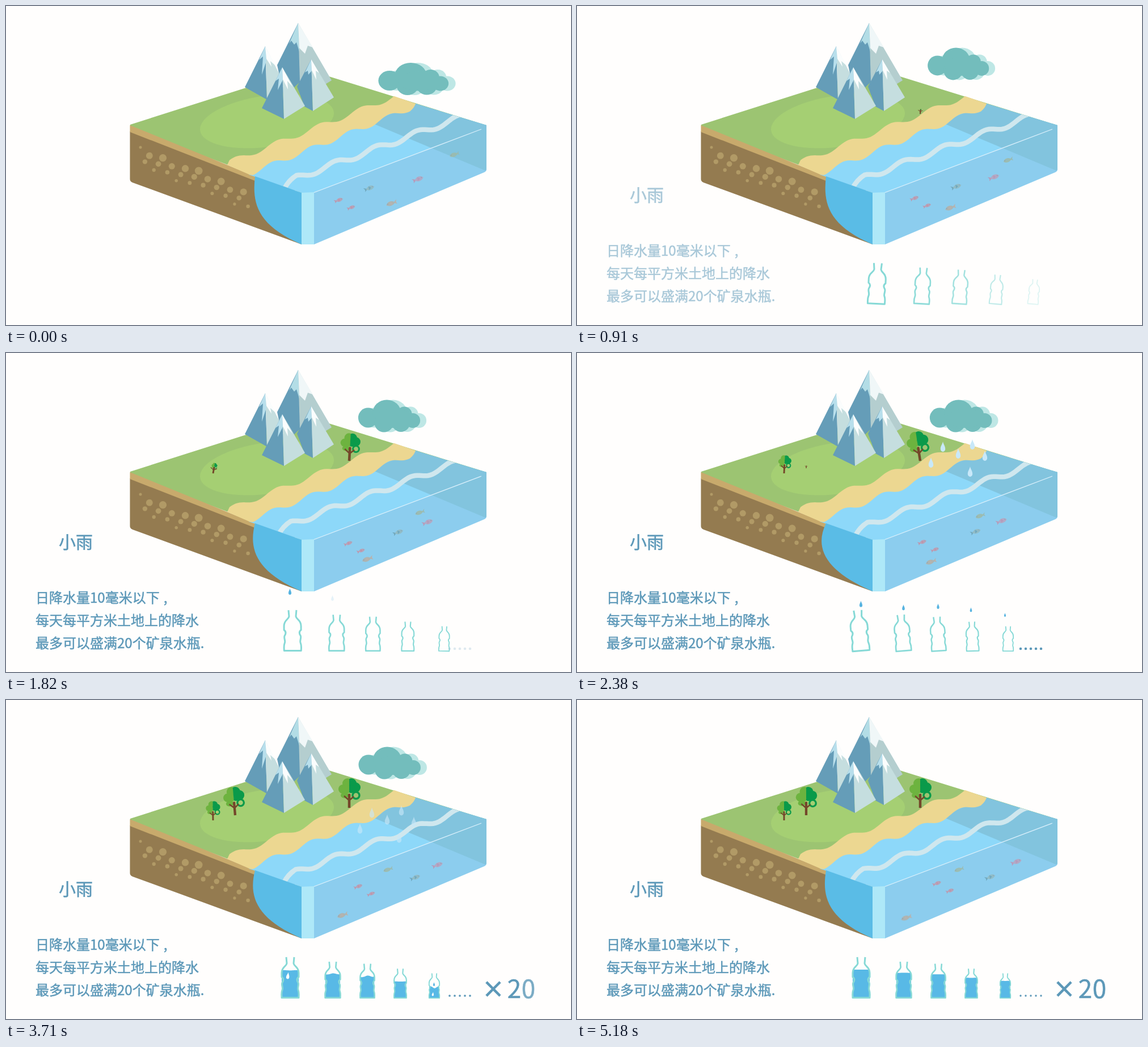
Animation of 996 by 562 pixels, one loop 5.25 s. Source, as an HTML page:

```html
<!DOCTYPE html>
<html lang="zh">
<head>
<meta charset="utf-8">
<title>小雨</title>
<style>
html, body { margin: 0; width: 100%; height: 100%; overflow: hidden; background: #fffefd; }
svg { display: block; width: 996px; height: 562px; }
text {
  font-family: "Noto Sans CJK SC", "Noto Sans CJK", "Noto Sans", sans-serif;
  fill: #5c98b8; stroke: #5c98b8; stroke-width: .5px;
}
.times { font-family: "Noto Sans", sans-serif; stroke: none; }
</style>
</head>
<body>
<svg viewBox="0 0 996 562">
  <defs>
    <clipPath id="top"><path d="M439 300L521 329H543L838 217L847 210L722 172Z"/></clipPath>
    <clipPath id="leftHalf"><rect x="-30" y="-60" width="30.5" height="60"/></clipPath>
    <clipPath id="rightHalf"><rect y="-60" width="30" height="60"/></clipPath>
    <clipPath id="body"><path d="M-6-73V-63C-6-56-15-56-15-44V0H15V-44C15-56 6-56 6-63V-73Z"/></clipPath>
    <g id="puffs">
      <circle cx="-37" cy="3" r="17.5"/>
      <ellipse cx="-4" cy="-5.500" rx="25" ry="23"/>
      <circle cx="-9" cy="11.500" r="17"/>
      <circle cx="21" cy="12" r="16"/>
      <circle cx="27" cy="-3" r="13.5"/>
      <circle cx="42" cy="8" r="13"/>
      <ellipse cx="8" cy="4" rx="32" ry="17"/>
    </g>
    <path id="drop" d="M0-9C1-4 4.2-1 4.2 4A4.2 5 0 0 1-4.2 4C-4.2-1-1-4 0-9Z"/>
    <g id="canopy">
      <g clip-path="url(#leftHalf)" fill="#6db33f">
        <circle cx="-3" cy="-43" r="9"/><circle cx="-11" cy="-33" r="8"/>
        <circle cx="-5" cy="-33" r="8"/><ellipse cx="-8" cy="-22" rx="7" ry="5"/>
      </g>
      <g clip-path="url(#rightHalf)" fill="#0a9a4a">
        <circle cx="4" cy="-43" r="9"/><circle cx="11" cy="-36" r="9"/><circle cx="4" cy="-33" r="7"/>
        <circle cx="12" cy="-22" r="6" fill="none" stroke="#0a9a4a" stroke-width="3.4"/>
      </g>
    </g>
    <path id="trunk" fill="none" stroke="#74472a" stroke-width="2.500" d="M0 0V-25M-1 0V-24M1 0V-24M0-13L-9-21M0-13L8-20"/>
    <path id="glass" fill="none" stroke="#86d9d6" stroke-width="3" stroke-linejoin="round"
      d="M-7-73L-6-62C-7-56-15-56-15-45V-38C-11-35-12-31-14-28C-16-24-12-19-14-15C-16-10-15-6-15-1.500H15C15-6 16-10 14-15C12-19 16-24 14-28C12-31 11-35 15-38V-45C15-56 7-56 6-62L7-73"/>
  </defs>

  <!-- land -->
  <path fill="#9cc472" d="M219 209L527 111L847 210L521 329L219 215Z"/>
  <ellipse fill="#a5cf73" cx="460" cy="203" rx="119" ry="45" transform="rotate(-8 460 203)"/>
  <path fill="#947b50" d="M218.500 221L521 335V420L223 311Q218.500 309 218.500 305Z"/>
  <path fill="#c8aa6c" d="M218.500 210L439 300V308L218.500 222Z"/>
  <g id="stones" fill="#b19a66"></g>

  <!-- sea -->
  <path fill="#8dd8f9" d="M428 297L440 276L640 204L722 172L847 210L838 217L543 329H521Z"/>
  <path fill="#8ccdee" d="M543 329L838 217L847 210V288Q847 291 843 293L543 420Z"/>
  <path fill="#82c4de" d="M642 205L722 172L847 210V288L845 290Z"/>
  <path id="sand" fill="#ecd791"/>
  <g clip-path="url(#top)"><path id="foam" fill="none" stroke="#cfe7ee" stroke-width="8.500"/></g>
  <path id="water" fill="#5abce6"/>
  <path fill="#aee8f8" d="M521 329L543 328V420H521Z"/>
  <path fill="none" stroke="#d8effb" stroke-width="1.300" d="M543 328.500L838 217"/>
  <g id="fishes" opacity=".8"></g>

  <!-- mountains: shaded side, lit side, snow -->
  <path fill="#659db8" d="M515 30L478 104L490 160L519 133Z"/>
  <path fill="#b4cecf" d="M515 30L574 131L540 152L518 133Z"/>
  <path fill="#b3dde6" d="M515 30L499 66L503 61L508 68L512 64L517 80Z"/>
  <path fill="#f0f7f8" d="M515 30L541 73L532 70L527 84L517 74Z"/>
  <path fill="#659db8" d="M457 71L421 143L460 165Z"/>
  <path fill="#c5dedf" d="M457 71L492 140L460 165Z"/>
  <path fill="#b8dfec" d="M457 71L446 95L453 89L451 121L459 97Z"/>
  <path fill="#fbfdfd" d="M457 71L475 105L466 97L468 107L459 93Z"/>
  <path fill="#659db8" d="M538 94L513 142L526 177L541 185Z"/>
  <path fill="#c5dedf" d="M538 94L578 161L541 185Z"/>
  <path fill="#b8dfec" d="M538 94L527 117L532 114L533 121L539 114Z"/>
  <path fill="#fbfdfd" d="M538 94L552 118L546 114L547 130L539 113Z"/>
  <path fill="#659db8" d="M487 108L451 180L490 199Z"/>
  <path fill="#c5dedf" d="M487 108L527 176L490 199Z"/>
  <path fill="#b8dfec" d="M487 108L475 132L481 128L479 148L488 130Z"/>
  <path fill="#fbfdfd" d="M487 108L505 142L496 132L497 147L488 129Z"/>

  <g id="trees"></g>
  <g id="rain" fill="#c8e8f9"></g>
  <g id="cloud">
    <use href="#puffs" x="11" fill="#bee7e5"/>
    <use href="#puffs" fill="#73bdbc"/>
  </g>

  <g id="words">
    <text x="93" y="343.500" font-size="30">小雨</text>
    <g font-size="24">
      <text x="52" y="439.500">日降水量10毫米以下<tspan dx="7">,</tspan></text>
      <text x="52" y="480">每天每平方米土地上的降水</text>
      <text x="52" y="520">最多可以盛满20个矿泉水瓶.</text>
    </g>
  </g>

  <g id="bottles"></g>
  <path id="dots" d="M782 521H819" fill="none" stroke="#5c98b8" stroke-linecap="round" stroke-dasharray="0 9"/>
  <g id="count" text-anchor="middle">
    <text class="times" x="859" y="531" font-size="62">×</text>
    <text x="896" y="525" font-size="44">2</text>
    <text x="921" y="525" font-size="44">0</text>
  </g>
</svg>
<script>
const LOOP = 5250, STEP = 70;
const $ = id => document.getElementById(id);

// Progress from 0 to 1 between two times: linear, smooth, slowing down
const ramp = (t, a, b) => Math.min(1, Math.max(0, (t - a) / (b - a)));
const smooth = (t, a, b) => { const p = ramp(t, a, b); return p * p * (3 - 2 * p); };
const slow = (t, a, b) => 1 - (1 - ramp(t, a, b)) ** 2;
const mix = (a, b, p) => a + (b - a) * p;
const turn = p => 2 * Math.PI * p;

const place = (el, x, y, rot = 0, sx = 1, sy = sx) =>
  el.setAttribute("transform", `translate(${x} ${y}) rotate(${rot}) scale(${sx} ${sy})`);
const fade = (el, v) => el.setAttribute("opacity", v);
const fill = (id, list, make) => { $(id).innerHTML = list.map(make).join(""); };

// Rippled sloping line that lies flat around (cx, cy)
function ripple(from, to, cx, cy, slope, period) {
  const points = [], n = 80;
  for (let i = 0; i <= n; i++) {
    const x = mix(from, to, i / n);
    points.push(`${x} ${cy - slope * (x - cx) + 5 * Math.sin(turn((x - cx) / period))}`);
  }
  return points.join("L");
}
$("sand").setAttribute("d", `M${ripple(684, 394, 645, 175, .397, 74)}L390 280L429 297L` +
  `${ripple(435, 712, 692, 189, .405, 68.5)}Q720 179 722 172Z`);
$("foam").setAttribute("d", `M${ripple(815, 508, 738, 217, .37, 72)}Q494 306 486 322`);

// Stones scattered evenly below the topsoil
fill("stones", [...Array(25).keys()], i => {
  const x = 237 + i * 7.9, depth = 20 + 36 * (i * .618 % 1), r = 2.5 + 4.5 * (i * .382 % 1);
  return `<circle cx="${x}" cy="${222 + (x - 219) * .39 + depth}" r="${r}"/>`;
});

// Fish swim from one point to another until the end time
const fishes = [
  { from: [587, 342], to: [635, 323], end: 5180, size: .8, fin: "#cc879b", skin: "#c399ab" },
  { from: [609, 355], to: [658, 336], end: 5180, size: .75, fin: "#cc879b", skin: "#c399ab" },
  { from: [727, 305], to: [775, 285], end: 5180, size: 1, fin: "#c18fae", skin: "#bda1bb" },
  { from: [641, 321], to: [729, 312], end: 5180, size: .95, fin: "#6ba0b2", skin: "#94b9bd", pace: slow },
  { from: [790, 262], to: [673, 299], end: 3500, size: .9, fin: "#9cb9ac", skin: "#a2b9a0" },
  { from: [679, 348], to: [580, 384], end: 4250, size: 1, fin: "#c2ad9f", skin: "#b6aea2" }
];
fill("fishes", fishes, f =>
  `<g><path fill="${f.fin}" d="M-4 0L-11-4L-9 0L-10 4Z"/><path fill="${f.skin}" d="M9 0C5-6-3-5-7 0C-3 5 5 5 9 0Z"/>
  <path fill="${f.fin}" d="M-1-4L3 0L-2 3Z"/><circle cx="6" cy="-1" r=".9" fill="#8799ad"/></g>`);

const trees = [
  { x: 365, y: 212, size: .65, start: 1250 },
  { x: 404, y: 203, size: .96, start: 2250 },
  { x: 605, y: 190, size: 1, start: 700 }
];
fill("trees", trees, () => `<g><use href="#canopy"/><use href="#trunk"/></g>`);

const rain = [[645, 165], [697, 161], [672, 177], [719, 181], [624, 193], [693, 209]];
fill("rain", rain, () => `<use href="#drop"/>`);

// Bottles: x, size
const bottles = [[501, 1], [576, .89], [637, .84], [695, .72], [755, .61]];
fill("bottles", bottles, () =>
  `<g><g><path clip-path="url(#body)" fill="#58b9e6"/><use href="#drop" fill="#fffefd"/><use href="#glass"/></g>
  <use href="#drop" fill="#56b3e0"/></g>`);

function drawBottle(t, [x, size], i) {
  const u = t - i * 150;
  const [box, drip] = $("bottles").children[i].children;
  const [liquid, bubble] = box.children;

  const slide = 62 * (1 - ramp(u, 0, 2300)) ** 1.7;
  const rot = 7 * (1 - ramp(u, 0, 1400)) - 5 * Math.sin(Math.PI * ramp(u, 1800, 2850));
  place(box, x + slide, 526, rot, size);
  fade(box, smooth(u, 0, 900));

  const since = Math.max(0, u - 2880);
  const level = -51 * (1 - Math.exp(-since / 220));
  const wave = 7 * Math.exp(-since / 600) * Math.cos((since - 190) / 130);
  liquid.setAttribute("d", since &&
    `M-15 0V${level - wave / 2}C-6 ${level - wave} -3 ${level + wave} 2 ${level + wave * .7}S10 ${level - wave} 15 ${level}V0Z`);

  // A pale bubble sinks at the first splash and once more later
  const sunk = ramp(u, u < 3400 ? 2880 : 3650, u < 3400 ? 3180 : 3950);
  place(bubble, -4, mix(-50, -2, sunk), 8, .65);
  fade(bubble, sunk > 0 && sunk < 1 ? 1 : 0);

  const fall = -106 + 22 * smooth(u, 1780, 2380) + .083 * Math.max(0, u - 2600);
  place(drip, x - .5, 526 + fall * size, 0, size * .62);
  fade(drip, u < 3140 ? ramp(u, 1650, 1780) : 0);
}

function drawTree(t, { x, y, size, start }, i) {
  const u = t - start, g = $("trees").children[i], [leaves, wood] = g.children;
  const grown = slow(u, 0, 1250), leafy = ramp(u, 130, 1230);
  place(g, x, y, 10 * Math.sin(turn(ramp(u, 0, 2500))), size);
  place(leaves, 0, -18 * grown * (1 - leafy), 0, leafy);
  place(wood, 0, 0, 0, Math.min(1, grown * 1.5), grown);
}

function draw(t) {
  const sway = Math.cos(turn(t / 1200));
  place($("foam"), 5 * sway - 1, sway);

  const swell = smooth(t, 1400, 2380) * Math.exp(-Math.max(0, t - 2380) / 1400);
  $("water").setAttribute("d", `M439 300C${434 - 17 * swell} 345 440 385 521 420V329Z`);

  fishes.forEach(({ from, to, end, size, pace = ramp }, i) => {
    const p = pace(t, 0, end), dir = Math.sign(to[0] - from[0]);
    place($("fishes").children[i], mix(from[0], to[0], p), mix(from[1], to[1], p), -20, size * dir, size);
  });

  trees.forEach((tree, i) => drawTree(t, tree, i));

  // The cloud springs into place and fades at the end
  const drift = 42 * Math.exp(-t / 550) * Math.cos(t / 433);
  const bob = 17.5 * Math.cos(turn(t / 1400)) * (1 - smooth(t, 700, 1700));
  place($("cloud"), 676 + drift, 111 + bob, 0, 1 + drift * .0031, 1);
  fade($("cloud"), 1 - ramp(t, 4550, 5040));

  const shift = 64 * slow(t, 1800, 4700) - 23;
  rain.forEach(([x, y], i) => place($("rain").children[i], x, y + shift));
  fade($("rain"), ramp(t, 1850, 2250) * (1 - ramp(t, 3300, 4400)));

  fade($("words"), ramp(t, 200, 1550));
  bottles.forEach((bottle, i) => drawBottle(t, bottle, i));

  fade($("dots"), ramp(t, 1750, 2100));
  $("dots").setAttribute("stroke-width", mix(4.6, 3.4, smooth(t, 2800, 4200)));
  [...$("count").children].forEach((el, i) => {
    const p = ramp(t, 3230 + i * 90, 3600 + i * 90);
    place(el, 0, 8 * (1 - p) ** 2);
    fade(el, p);
  });
}

const start = performance.now();
function tick(now) {
  const t = Math.max(0, now - start) % LOOP;
  draw(Math.floor(t / STEP) * STEP);
  requestAnimationFrame(tick);
}
draw(0);
requestAnimationFrame(tick);
</script>
</body>
</html>
```
